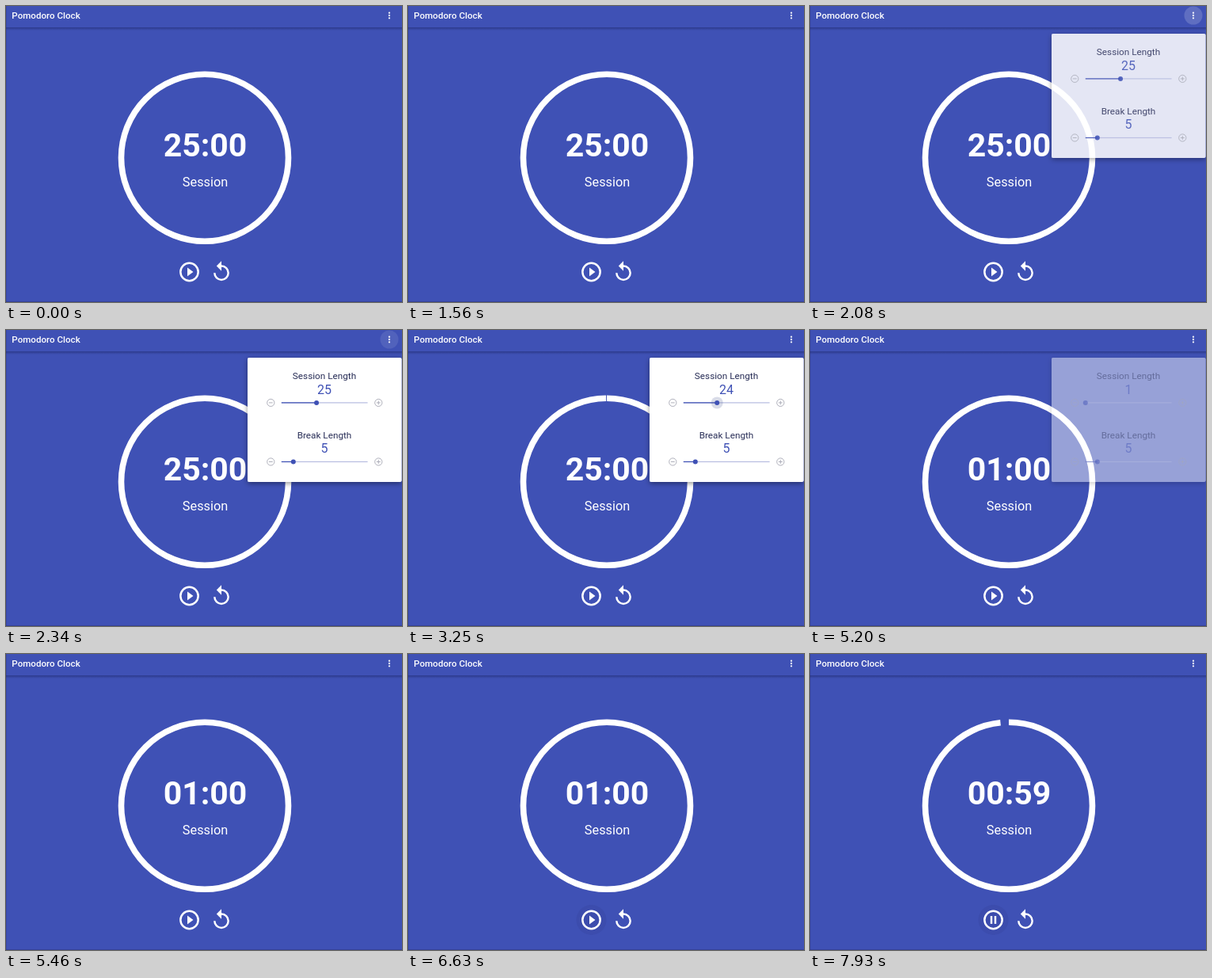
Recreate the animation shown at these times as an HTML page with a canvas. Size 500 by 374 pixels, loop 8 s.

```html
<!DOCTYPE html>
<html lang="en">
<head>
<meta charset="utf-8">
<title>Pomodoro Clock</title>
<style>
  html, body { margin: 0; height: 100%; overflow: hidden; background: #3f51b5; }
  canvas { display: block; width: 100vw; height: 100vh; }
</style>
</head>
<body>
<canvas id="stage" width="500" height="374"></canvas>
<script>
const ctx = document.getElementById('stage').getContext('2d');
const LOOP = 8000, STEP = 130;
const BLUE = '#3f51b5', INK = '#2a2f58', GREY = '#a6a8b4';

// Linear interpolation through [time, value] points.
function track(t, points) {
  let [t0, v0] = points[0];
  for (const [t1, v1] of points) {
    if (t < t1) return t1 === t0 ? v1 : v0 + (v1 - v0) * (t - t0) / (t1 - t0);
    [t0, v0] = [t1, v1];
  }
  return v0;
}

function text(str, x, y, size, color, weight = 400, align = 'center') {
  ctx.font = `${weight} ${size}px Roboto, sans-serif`;
  ctx.textAlign = align;
  ctx.fillStyle = color;
  ctx.fillText(str, x, y);
}

function disc(x, y, r, color) {
  ctx.fillStyle = color;
  ctx.beginPath();
  ctx.arc(x, y, r, 0, Math.PI * 2);
  ctx.fill();
}

function arc(x, y, r, width, color, from = 0, to = Math.PI * 2) {
  ctx.strokeStyle = color;
  ctx.lineWidth = width;
  ctx.beginPath();
  ctx.arc(x, y, r, from, to);
  ctx.stroke();
}

function triangle(x1, y1, x2, y2, x3, y3) {
  ctx.beginPath();
  ctx.moveTo(x1, y1);
  ctx.lineTo(x2, y2);
  ctx.lineTo(x3, y3);
  ctx.fill();
}

function rect(x, y, w, h, color) {
  ctx.fillStyle = color;
  ctx.fillRect(x, y, w, h);
}

// Draws on a 24-unit icon grid centred at x, y.
function icon(x, y, draw) {
  ctx.save();
  ctx.translate(x, y);
  ctx.scale(1.24, 1.24);
  ctx.translate(-12, -12);
  ctx.fillStyle = '#fff';
  draw();
  ctx.restore();
}

function drawHeader(t) {
  const shade = ctx.createLinearGradient(0, 26.5, 0, 31);
  shade.addColorStop(0, 'rgba(15,20,70,.42)');
  shade.addColorStop(1, 'rgba(15,20,70,0)');
  rect(0, 27, 500, 4, shade);
  text('Pomodoro Clock', 7.3, 16.3, 11.6, '#fff', 500, 'left');

  const ripple = track(t, [[1690, 0], [1820, .1], [2080, .17], [2210, .15], [2600, 0]]);
  const radius = track(t, [[1820, 6], [2080, 11.5]]);
  if (ripple) disc(484, 12, radius, `rgba(255,255,255,${ripple})`);
  for (const dy of [-3.3, 0, 3.3]) disc(484, 12 + dy, 1.15, '#fff');
}

function drawClock(t, minutes) {
  const ticking = t >= 7800;
  let gap = track(t, [[7670, 0], [7800, 3], [7930, 5.7]]);
  if (t >= 3250 && t < 4160) gap = .5;
  const top = -Math.PI / 2;
  arc(251, 191.8, 105.5, 7.6, '#fff', top, top + (360 - gap) * Math.PI / 180);
  const label = ticking ? '00:59' : String(minutes).padStart(2, '0') + ':00';
  text(label, 251.5, 189.6, 41, '#fff', 700);
  text('Session', 251.5, 228.3, 16.3, '#fff');
}

function drawControls(t) {
  if (t >= 6110) disc(231.5, 336, 19, 'rgba(20,25,80,.07)');
  const ripple = track(t, [[6630, 0], [6760, .12], [6890, .14], [7280, 0]]);
  if (ripple) disc(231.5, 336, track(t, [[6760, 10], [7020, 20]]), `rgba(255,255,255,${ripple})`);

  icon(231.5, 336, () => {
    arc(12, 12, 9, 2, '#fff');
    if (t < 6760) triangle(10, 7.5, 16, 12, 10, 16.5);
    else for (const x of [9, 13]) rect(x, 8, 2, 8, '#fff');
  });
  icon(272, 336, () => {
    arc(12, 13, 7, 2, '#fff', -Math.PI / 2, Math.PI);
    triangle(12, 1, 7, 6, 12, 11);
  });
}

function drawSlider(label, y, value, max, halo) {
  const left = 347.8, width = 108.8;
  const x = left + width * (value - 1) / (max - 1);
  text(label, 402, y - 29.6, 11.75, INK);
  text(value, 402, y - 11.2, 16, BLUE);
  rect(left, y - .6, width, 1.2, '#b6bce0');
  rect(left, y - .6, x - left, 1.2, BLUE);
  if (halo) disc(x, y, 7.5, `rgba(63,81,140,${halo})`);
  disc(x, y, 3, BLUE);
  for (const bx of [334.3, 470.3]) {
    arc(bx, y, 4.6, .9, GREY);
    rect(bx - 2.4, y - .45, 4.8, .9, GREY);
  }
  rect(469.85, y - 2.4, .9, 4.8, GREY);
}

function drawPanel(t, session) {
  const alpha = track(t, [[1820, 0], [1950, .42], [2080, .86], [2210, 1],
    [4940, 1], [5070, .86], [5200, .46], [5330, .12], [5460, 0]]);
  if (!alpha) return;
  const halo = track(t, [[2600, 0], [2730, .12], [2860, .2], [4420, .2], [4810, 0]]);
  ctx.save();
  ctx.globalAlpha = alpha;
  ctx.save();
  ctx.shadowColor = 'rgba(0,0,0,.42)';
  ctx.shadowBlur = 6;
  ctx.shadowOffsetY = 2;
  ctx.fillStyle = '#fff';
  // Keep the shadow outside the card so it does not darken the faded panel.
  ctx.beginPath();
  ctx.rect(0, 0, 500, 374);
  ctx.roundRect(305, 35, 194.5, 157, 2);
  ctx.clip('evenodd');
  ctx.beginPath();
  ctx.roundRect(305, 35, 194.5, 157, 2);
  ctx.fill();
  ctx.restore();
  ctx.fillStyle = '#fff';
  ctx.beginPath();
  ctx.roundRect(305, 35, 194.5, 157, 2);
  ctx.fill();
  drawSlider('Session Length', 91.9, session, 60, halo);
  drawSlider('Break Length', 166.5, 5, 30, 0);
  ctx.restore();
}

const sessionAt = t => Math.round(track(t, [[3120, 25], [3250, 24], [3640, 11],
  [3770, 11], [3900, 6], [4160, 1]]));

function render(t) {
  rect(0, 0, 500, 374, BLUE);
  drawHeader(t);
  drawClock(t, sessionAt(t - STEP));
  drawControls(t);
  rect(0, 0, 1, 374, 'rgba(30,30,90,.2)');
  rect(0, 373, 500, 1, 'rgba(30,30,90,.3)');
  drawPanel(t, sessionAt(t));
}

let start;
function frame(now) {
  start ??= now;
  const t = (now - start) % LOOP;
  render(Math.floor(t / STEP) * STEP);
  requestAnimationFrame(frame);
}
render(0);
requestAnimationFrame(frame);
</script>
</body>
</html>
```
